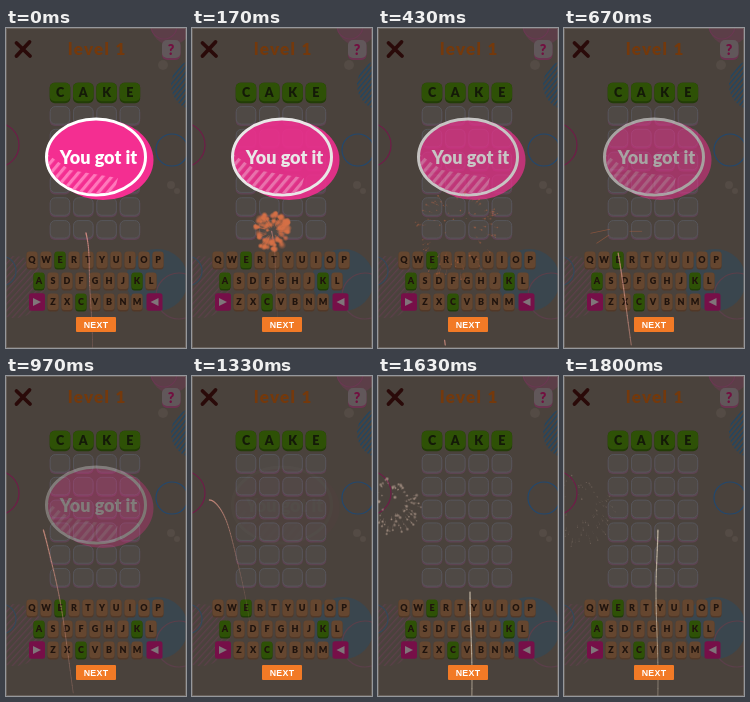
These frames come from a looping animation (180x320 px, 1.83 s). An HTML page with a canvas:

```html
<!DOCTYPE html>
<html lang="en">
<head>
<meta charset="utf-8">
<title>Level complete</title>
<style>
  html, body { margin: 0; width: 100%; height: 100%; overflow: hidden; background: #4a423c; }
  #stage { position: relative; width: 180px; height: 320px; overflow: hidden; }
  svg, canvas { position: absolute; left: 0; top: 0; width: 180px; height: 320px; }
  text { font-family: Lato, "Open Sans", sans-serif; font-weight: 900; }
  .mid { text-anchor: middle; }
  .ring { fill: none; stroke-width: 1.2; }
  .next { font-family: "Liberation Sans", Arial, sans-serif; font-weight: 700; }
</style>
</head>
<body>
<div id="stage">
  <svg viewBox="0 0 180 320">
    <defs>
      <pattern id="blueHatch" width="3.6" height="3.6" patternUnits="userSpaceOnUse" patternTransform="rotate(40)">
        <rect width="1.3" height="3.6" fill="#1d4666"/>
      </pattern>
      <pattern id="pinkHatch" width="4.5" height="4.5" patternUnits="userSpaceOnUse" patternTransform="rotate(42)">
        <rect width="1.2" height="4.5" fill="#5d3f4a"/>
      </pattern>
      <pattern id="badgeHatch" width="7" height="7" patternUnits="userSpaceOnUse" patternTransform="rotate(40)">
        <rect width="3.2" height="7" fill="#ff78bb"/>
      </pattern>
      <clipPath id="badgeClip"><ellipse cx="90" cy="129" rx="48" ry="37"/></clipPath>
    </defs>

    <rect width="180" height="320" fill="#4a423c"/>
    <circle cx="165" cy="-3" r="20" fill="#5c3e48"/>
    <circle class="ring" cx="158" cy="-2" r="13" stroke="#6a3852"/>
    <circle cx="190" cy="57" r="25" fill="url(#blueHatch)"/>
    <circle class="ring" cx="166" cy="122" r="16" stroke="#22486e"/>
    <circle class="ring" cx="-9" cy="117" r="22" stroke="#6f1c48"/>
    <g fill="#544b45">
      <circle cx="157" cy="37" r="5"/><circle cx="165" cy="157" r="4"/><circle cx="171" cy="163" r="3"/>
    </g>
    <circle cx="151" cy="252" r="31" fill="#3a464e"/>
    <circle class="ring" cx="173" cy="268" r="23" stroke="#5b3f4a"/>
    <circle cx="8" cy="259" r="31" fill="url(#pinkHatch)"/>
    <circle class="ring" cx="-5" cy="243" r="15" stroke="#34495c"/>

    <path d="M10.500 15 L24 28 M23.500 14 L10.500 28" stroke="#2a0a09" stroke-width="3.8" stroke-linecap="round"/>
    <text x="62" y="27" font-size="17" letter-spacing="1.3" fill="#74390c">level 1</text>
    <rect x="156" y="13" width="18.500" height="19" rx="5" fill="#6b3350"/>
    <rect x="156" y="12" width="18.500" height="18" rx="5" fill="#61575a"/>
    <text class="mid" x="165" y="26.500" font-size="14" fill="#720f40">?</text>

    <g id="board"></g>

    <g id="badge">
      <ellipse cx="97" cy="132" rx="50.500" ry="40" fill="#f42e91"/>
      <ellipse cx="90" cy="129" rx="49.500" ry="38" fill="#f42e91" stroke="#fff" stroke-width="3"/>
      <path clip-path="url(#badgeClip)" d="M38 124 L64 142 L112 150 L106 172 L38 172 Z" fill="url(#badgeHatch)"/>
      <text class="mid" x="92.500" y="136" font-size="18" fill="#fff">You got it</text>
    </g>
  </svg>

  <canvas id="sky" width="180" height="320"></canvas>

  <svg viewBox="0 0 180 320">
    <rect x="70" y="289" width="40" height="15" rx="1" fill="#f27a26"/>
    <text class="mid next" x="90" y="299.500" font-size="8.800" letter-spacing=".3" fill="#fff">NEXT</text>
    <rect x=".5" y=".5" width="179" height="319" fill="none" stroke="#918a84" stroke-opacity=".4"/>
  </svg>
</div>

<script>
const LOOP = 1830, FADE = 1350, GRAVITY = 2.33e-4;
const board = document.getElementById('board');
const badge = document.getElementById('badge');
const canvas = document.getElementById('sky');
const scale = Math.max(2, window.devicePixelRatio || 1);
canvas.width = 180 * scale;
canvas.height = 320 * scale;
const ctx = canvas.getContext('2d');
ctx.scale(scale, scale);
ctx.lineCap = 'round';

function box(cx, cy, w, h, r, fill, stroke = 'none') {
  return `<rect x="${cx - w / 2}" y="${cy - h / 2}" width="${w}" height="${h}" rx="${r}" fill="${fill}" stroke="${stroke}"/>`;
}

function label(cx, y, size, fill, text) {
  return `<text class="mid" x="${cx}" y="${y}" font-size="${size}" fill="${fill}">${text}</text>`;
}

function buildBoard() {
  let out = '';
  for (let col = 0; col < 4; col++) {
    const x = 54 + col * 23.3;
    out += box(x, 65, 20.5, 20.5, 5, '#223c07') + box(x, 64, 20.5, 18.5, 5, '#2e5106');
    out += label(x, 69, 12.5, '#141a08', 'CAKE'[col]);
    for (let row = 1; row <= 6; row++) {
      const y = 65 + row * 22.8;
      out += box(x, y + 0.7, 20.5, 19, 5, '#5d4452');
      out += box(x, y - 0.5, 19.5, 17.5, 5, '#4f4945', '#56565a');
    }
  }
  const rows = [['QWERTYUIOP', 26, 232], ['ASDFGHJKL', 33, 253], ['ZXCVBNM', 47, 274]];
  for (const [letters, left, y] of rows) {
    [...letters].forEach((ch, i) => {
      const x = left + i * 14;
      const used = 'CAKE'.includes(ch);
      out += box(x, y + 0.8, 11, 17.5, 3, used ? '#203d07' : '#523827');
      out += box(x, y - 0.2, 11, 16.5, 3, used ? '#2e5106' : '#65462f');
      out += label(x, y + 3.2, 9, '#1f130d', ch);
    });
  }
  for (const [x, dir] of [[31, 1], [148.5, -1]]) {
    out += box(x, 274, 16, 17.5, 2.5, '#760f48');
    out += `<path d="M${x - 4 * dir} 270 L${x + 4 * dir} 274 L${x - 4 * dir} 278 Z" fill="#80757a"/>`;
  }
  board.innerHTML = out;
}

function random(seed) {
  return () => {
    seed = (seed * 16807) % 2147483647;
    return seed / 2147483647;
  };
}

// Each shell is a projectile: linear in x, parabolic in y up to its apex.
const shells = [
  { start: -700, end: 60, apex: 90, x: 79.5, y: 203, vx: -0.0096, sway: 0.4, color: '211,139,132' },
  { start: 420, end: 1350, apex: 1330, x: 17.5, y: 124, vx: -0.055, sway: 0.4, color: '200,138,124' },
  { start: 1400, end: 2498, apex: 2498, x: 93, y: 41, vx: 0, sway: 1, color: '205,192,172' }
];

const bursts = [
  { at: 70, x: 81, y: 203, reach: 64, life: 560, color: '214,112,70', parts: makeParts(90, 71) },
  { at: 1355, x: 14, y: 127, reach: 46, life: 580, color: '190,165,150', parts: makeParts(80, 913) }
];

function makeParts(count, seed) {
  const rnd = random(seed);
  return Array.from({ length: count }, () => ({
    angle: rnd() * Math.PI * 2,
    speed: 0.3 + 0.75 * Math.sqrt(rnd()),
    size: 0.7 + rnd() * 0.8,
    glow: 0.5 + rnd() * 0.5
  }));
}

function shellAt(s, t) {
  const d = t - s.apex;
  return [s.x + s.vx * d + s.sway * Math.sin(d / 61.4), s.y + GRAVITY * d * d];
}

function line(a, b, width, color, alpha) {
  ctx.strokeStyle = `rgba(${color},${alpha})`;
  ctx.lineWidth = width;
  ctx.beginPath();
  ctx.moveTo(...a);
  ctx.lineTo(...b);
  ctx.stroke();
}

function drawShell(s, t) {
  if (t < s.start || t > s.end + 240) return;
  const head = Math.min(t, s.end);
  const fade = 1 - Math.max(0, t - s.end) / 240;
  const from = Math.max(s.start, t - 740);
  for (let u = from; u < head; u += 18) {
    const next = Math.min(u + 18, head);
    const fresh = 1 - (t - u) / 800;
    line(shellAt(s, u), shellAt(s, next), 0.6 + 0.7 * fresh, s.color, fade * (0.08 + 0.78 * fresh));
  }
}

function partAt(b, p, age) {
  const r = b.reach * p.speed * (1 - Math.exp(-age / 300));
  return [b.x + r * Math.cos(p.angle), b.y + r * Math.sin(p.angle) + 3.5e-5 * age * age];
}

function drawBurst(b, t) {
  const age = t - b.at;
  if (age < 0 || age > b.life) return;
  const left = 1 - age / b.life;
  for (const p of b.parts) {
    const alpha = p.glow * Math.min(1, left * 1.25);
    const radius = p.size * (0.4 + 2.4 * left * left);
    const tip = partAt(b, p, age);
    line(partAt(b, p, Math.max(0, age - 55)), tip, p.size * 0.8, b.color, alpha * 0.4);
    const glow = ctx.createRadialGradient(...tip, 0, ...tip, radius * 1.4);
    glow.addColorStop(0.3, `rgba(${b.color},${alpha})`);
    glow.addColorStop(1, `rgba(${b.color},0)`);
    ctx.fillStyle = glow;
    ctx.beginPath();
    ctx.arc(...tip, radius * 1.4, 0, Math.PI * 2);
    ctx.fill();
  }
}

function drawEmbers(t) {
  const fade = 1 - Math.abs(t - 660) / 110;
  if (fade <= 0) return;
  const drift = (t - 660) * 0.02;
  for (const [x1, y1, x2, y2] of [[27, 205, 46, 201], [33, 215, 45, 207], [66, 203, 78, 203]]) {
    line([x1 - drift, y1 + drift], [x2 - drift, y2 + drift], 0.8, '205,105,65', 0.5 * fade);
  }
}

function draw(t) {
  badge.style.opacity = Math.max(0, 1 - t / FADE);
  ctx.clearRect(0, 0, 180, 320);
  shells.forEach(s => drawShell(s, t));
  bursts.forEach(b => drawBurst(b, t));
  drawEmbers(t);
}

buildBoard();
const begin = performance.now();
function tick() {
  draw((performance.now() - begin) % LOOP);
  requestAnimationFrame(tick);
}
tick();
</script>
</body>
</html>
```
